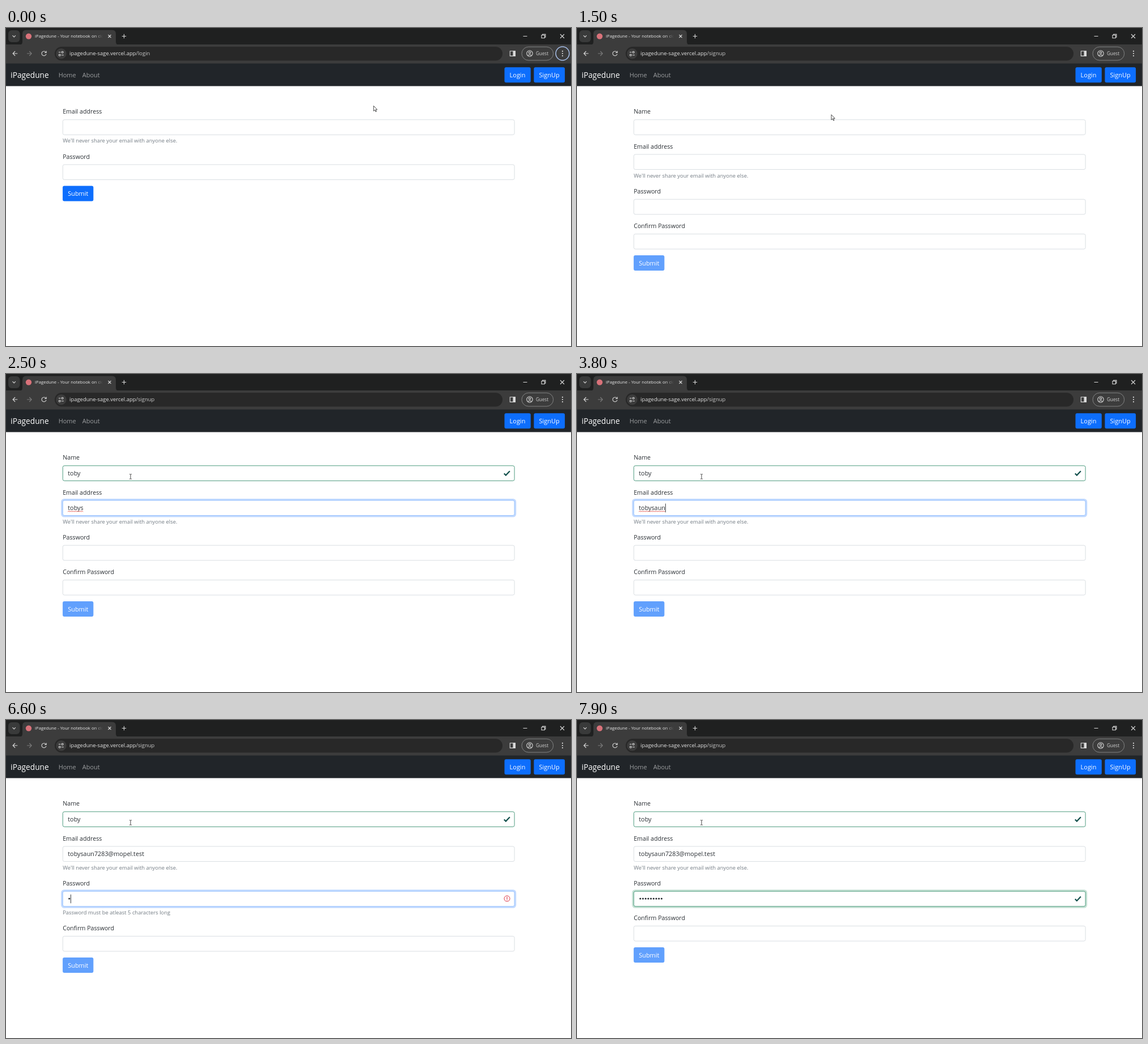
An HTML page that plays this animation: 998x561 px, repeating every 8 s.

```html
<!DOCTYPE html>
<html lang="en">
<head>
<meta charset="utf-8">
<title>Sign up form</title>
<style>
  html, body { margin: 0; width: 100%; height: 100%; overflow: hidden; background: #fff; }
  svg { display: block; width: 998px; height: 561px; }
  text { font-family: "Open Sans", "Noto Sans", sans-serif; white-space: pre; }
  .line { fill: none; stroke: #dadada; stroke-width: 1.1; }
  .label { font-size: 10.65px; fill: #2a2f34; }
  .value { font-size: 10.8px; fill: #2a2f34; }
  .hint { font-size: 9.43px; fill: #737c84; }
  .nav { font-size: 10.95px; fill: #9b9d9f; }
  .btn { font-size: 10.95px; fill: #fff; }
</style>
</head>
<body>
<svg viewBox="0 0 998 561" xmlns="http://www.w3.org/2000/svg">
  <defs>
    <linearGradient id="fade" gradientUnits="userSpaceOnUse" x1="157" x2="171">
      <stop stop-color="#e6e6e6"/><stop offset="1" stop-color="#e6e6e6" stop-opacity="0"/>
    </linearGradient>
  </defs>
  <rect width="998" height="561" fill="#fff"/>

  <!-- tab strip -->
  <rect width="998" height="30" fill="#1f2020"/>
  <rect x="4" y="4" width="20.5" height="21" rx="6" fill="#393a3a"/>
  <path class="line" d="M11.5 13.2l2.7 2.7 2.7-2.7" stroke-width="1.3"/>
  <path d="M23 30q6 0 6-6V10q0-6.500 6.500-6.500H187.500q6.500 0 6.500 6.500V24q0 6 6 6z" fill="#3c3c3c"/>
  <circle cx="40" cy="14.600" r="5.200" fill="#d9727a"/>
  <text x="51" y="17.300" font-size="7.750" fill="url(#fade)">iPagedune - Your notebook on clo</text>
  <path class="line" d="M180.500 12l5 5m0-5l-5 5M208.500 10.800v7.400m-3.700-3.700h7.400"/>
  <path class="line" d="M913.500 14.500h7M979 11l7 7m0-7l-7 7" stroke-width="1"/>
  <path class="line" d="M946 12.500h5.300v5.300h-5.300zM947.700 12.300v-1.300h5.200v5.200h-1.400" stroke-width=".9"/>

  <!-- toolbar -->
  <rect y="29" width="998" height="34" fill="#3c3c3c"/>
  <path class="line" d="M20.300 45h-8m3.800-4l-4 4 4 4" stroke-width="1.300"/>
  <path class="line" d="M37 45h8m-3.800-4l4 4-4 4" style="stroke:#7b7b7b"/>
  <path class="line" d="M70.300 42.600a4 4 0 1 0 .7 3.300M71.200 40.500v3h-3" stroke-width="1.300"/>
  <rect x="86" y="33" width="791" height="24.500" rx="12.200" fill="#282828"/>
  <circle cx="97.500" cy="45.200" r="9.200" fill="#3c3c3c"/>
  <path class="line" d="M93 42.700h3.500M98 47.700h4"/>
  <circle class="line" cx="99.700" cy="42.700" r="1.500"/>
  <circle class="line" cx="94.800" cy="47.700" r="1.500"/>
  <path class="line" d="M890.300 40.800h9.200v8.600h-9.200z"/>
  <path d="M895.500 40.500h4.300v9.200h-4.300z" fill="#dadada"/>
  <rect x="911" y="33.300" width="55.700" height="23.700" rx="11.850" fill="none" stroke="#8b8c8c" stroke-width=".9"/>
  <circle class="line" cx="925" cy="45" r="5.200"/>
  <circle class="line" cx="925" cy="43.500" r="1.700"/>
  <path class="line" d="M921.500 48.600q3.500-2.600 7 0"/>
  <text x="936" y="48" font-size="8.050" fill="#cfcfcf">Guest</text>
  <g fill="#dadada">
    <circle cx="983" cy="40.900" r="1.100"/><circle cx="983" cy="45" r="1.100"/><circle cx="983" cy="49.100" r="1.100"/>
  </g>

  <!-- page header -->
  <rect y="62.600" width="998" height="39.900" fill="#212529"/>
  <text x="8.300" y="88.300" font-size="13.700" fill="#fff">iPagedune</text>
  <text class="nav" x="92.700" y="87">Home</text>
  <text class="nav" x="134.800" y="87">About</text>
  <g id="live"></g>
</svg>
<script>
const LOOP = 8000;
const live = document.getElementById('live');
const pen = document.createElement('canvas').getContext('2d');
const EMAIL = 'tobysaun7283@mopel.test';
const SHARE = "We'll never share your email with anyone else.";

// [time, characters typed]
const nameKeys = [[0, 0], [1900, 1], [2100, 2], [2200, 3], [2300, 4]];
const mailKeys = [[0, 0], [2500, 5], [2800, 6], [2900, 7], [3000, 8], [4000, 9], [4200, 10], [4400, 11],
  [4600, 12], [4800, 13], [5300, 15], [5400, 17], [5500, 18], [5600, 20], [5700, 22], [5900, 23]];
const passKeys = [[0, 0], [6600, 1], [6700, 2], [6900, 3], [7000, 5], [7200, 6], [7300, 7], [7400, 8], [7600, 9]];
const caretOff = [[2500, 2800], [3500, 3700], [4900, 5100], [5800, 6000], [6400, 6600], [7900, 8000]];
// [time, x, y] of the pointer's hot spot
const path = [[0, 649.3, 137.3], [300, 649.3, 137.3], [600, 656, 184], [800, 800, 130], [1000, 952.5, 91],
  [1250, 952.5, 91], [1650, 220, 181], [LOOP, 220, 181]];

const tones = { plain: '#d3d8dd', focus: '#86b7fe', bad: '#dc3545', good: '#2f8a68' };
const glows = { focus: '#0d6efd', bad: '#dc3545', good: '#198754' };

const at = (keys, t) => keys.filter(k => k[0] <= t).pop()[1];
const text = (cls, x, y, s) => `<text class="${cls}" x="${x}" y="${y}">${s}</text>`;
const grade = (n, min) => n === 0 ? '' : n < min ? 'bad' : 'good';

function width(s) {
  pen.font = '10.8px "Open Sans", "Noto Sans", sans-serif';
  return pen.measureText(s).width;
}

function button(x, y, w, label, fill, opacity = 1) {
  return `<g opacity="${opacity}"><rect x="${x}" y="${y}" width="${w}" height="27" rx="2.9" fill="${fill}"/>`
    + text('btn', x + 9.1, y + 17.7, label) + '</g>';
}

function icon(kind, y) {
  if (kind === 'good')
    return `<path d="M879.8 ${y + .7}l3.1 3.2 7-7.4" fill="none" stroke="#12504c" stroke-width="2.2"/>`;
  return `<circle cx="885" cy="${y}" r="5" fill="none" stroke="#dc3545"/>
    <path d="M885 ${y - 2.8}v3.4m0 1v1.4" stroke="#dc3545" stroke-width="1.3"/>`;
}

function squiggle(y, w) {
  let d = `M109.2 ${y}`;
  for (let i = 0; i < Math.floor(w / 1.5); i++) d += `l1.5 ${i % 2 ? 1.6 : -1.6}`;
  return `<path d="${d}" fill="none" stroke="#e0453c" stroke-width=".8"/>`;
}

function field(f, y) {
  const top = y + 14.5, mid = y + 27.7;
  const tone = f.tone || (f.focus ? 'focus' : 'plain');
  let s = text('label', 100.2, y + 4, f.label);
  if (f.focus)
    s += `<rect x="98.7" y="${top - 1.5}" width="801" height="29.6" rx="4" fill="none"
      stroke="${glows[tone]}" stroke-opacity=".25" stroke-width="3"/>`;
  s += `<rect x="100.3" y="${top}" width="797.8" height="26.6" rx="2.9" fill="#fff" stroke="${tones[tone]}" stroke-width=".85"/>`;
  let end = 109.3;
  if (f.dots) {
    for (let i = 0; i < f.dots; i++) s += `<circle cx="${111.8 + i * 4.7}" cy="${mid - .2}" r="1.45" fill="#24292d"/>`;
    end += f.dots * 4.7;
  } else if (f.value) {
    s += text('value', 109.3, mid + 4.2, f.value);
    end += width(f.value);
  }
  if (f.wavy) s += squiggle(mid + 7, width(f.wavy));
  if (f.caret) s += `<rect x="${end}" y="${mid - 7.6}" width=".9" height="15.5" fill="#24292d"/>`;
  if (f.kind) s += icon(f.kind, mid - .3);
  if (f.hint) s += text('hint', 100.2, y + 55.1, f.hint);
  return s;
}

function form(fields, opacity) {
  let y = 147.3, s = '';
  for (const f of fields) {
    s += field(f, y);
    y += f.hint ? 79.2 : 61.2;
  }
  return s + button(100.1, y - 9.2, 54.3, 'Submit', '#0d6efd', opacity);
}

function signup(t) {
  const n = at(nameKeys, t), m = at(mailKeys, t), p = at(passKeys, t);
  const on = !caretOff.some(([a, b]) => t >= a && t < b);
  const onName = t >= 1700 && t < 2450, onMail = t >= 2450 && t < 6100, onPass = t >= 6100;
  const kindName = grade(n, 3), kindPass = grade(p, 5);
  return form([
    { label: 'Name', value: 'toby'.slice(0, n), focus: onName, caret: onName && on, kind: kindName,
      tone: grade(at(nameKeys, t - 90), 3), hint: kindName === 'bad' && 'Name must be atleast 3 characters long' },
    { label: 'Email address', value: EMAIL.slice(0, m), focus: onMail, caret: onMail && on,
      wavy: onMail && EMAIL.slice(0, Math.min(m, 8)), hint: SHARE },
    { label: 'Password', dots: p, focus: onPass, caret: onPass && on, kind: kindPass,
      tone: grade(at(passKeys, t - 90), 5), hint: kindPass === 'bad' && 'Password must be atleast 5 characters long' },
    { label: 'Confirm Password' }
  ], .65);
}

function pointer(t) {
  const i = path.findIndex(k => k[0] > t), a = path[i - 1], b = path[i];
  const u = (t - a[0]) / (b[0] - a[0]), e = u * u * (3 - 2 * u);
  return [a[1] + (b[1] - a[1]) * e, a[2] + (b[2] - a[2]) * e];
}

function cursor(x, y, hover) {
  const shapes = {
    arrow: '<path d="M0 0v9.200l2.200-2 1.500 3.300 1.400-.6-1.500-3.200h2.800z" fill="#fff" stroke="#222" stroke-width=".8"/>',
    beam: '<path d="M-2-4.200h1.500l.5.500.5-.5h1.500M0-3.700v7.400M-2 4.200h1.500l.5-.5.5.5h1.500" fill="none" stroke="#333" stroke-width=".9"/>',
    hand: '<path d="M-1 .5q1-1 2 0v3.700l4 .9q1 .3 1 1.400l-.7 3.500-.8 1.500h-4.600l-3.600-4.500q.4-1.500 1.700-.6l1 .8z" fill="#fff" stroke="#222" stroke-width=".7"/>'
  };
  const inField = x > 100 && x < 898 && y > 161.500 && y < 188.500;
  return `<g transform="translate(${x} ${y})">${shapes[hover ? 'hand' : inField ? 'beam' : 'arrow']}</g>`;
}

function draw(t) {
  const [x, y] = pointer(t);
  const hover = x > 932 && x < 987 && y > 69 && y < 96;
  const joined = t >= 1200;
  let s = `<text x="112" y="48.300" font-size="9.450" fill="#e3e3e3">ipagedune-sage.vercel.app<tspan fill="#c9c9c9">/${joined ? 'signup' : 'login'}</tspan></text>`;
  if (t < 800) s += '<circle cx="983" cy="45" r="11.900" fill="none" stroke="#a8c0ea" stroke-width="1.500"/>';
  s += button(880.5, 69.2, 46.3, 'Login', '#0d6efd');
  s += button(932.4, 69.2, 54.7, 'SignUp', hover ? '#0b5ed7' : '#0d6efd');
  s += joined ? signup(t) : form([{ label: 'Email address', hint: SHARE }, { label: 'Password' }], 1);
  return s + cursor(x, y, hover);
}

let last = '';
function tick() {
  const s = draw(performance.now() % LOOP);
  if (s !== last) live.innerHTML = last = s;
  requestAnimationFrame(tick);
}
tick();
</script>
</body>
</html>
```
